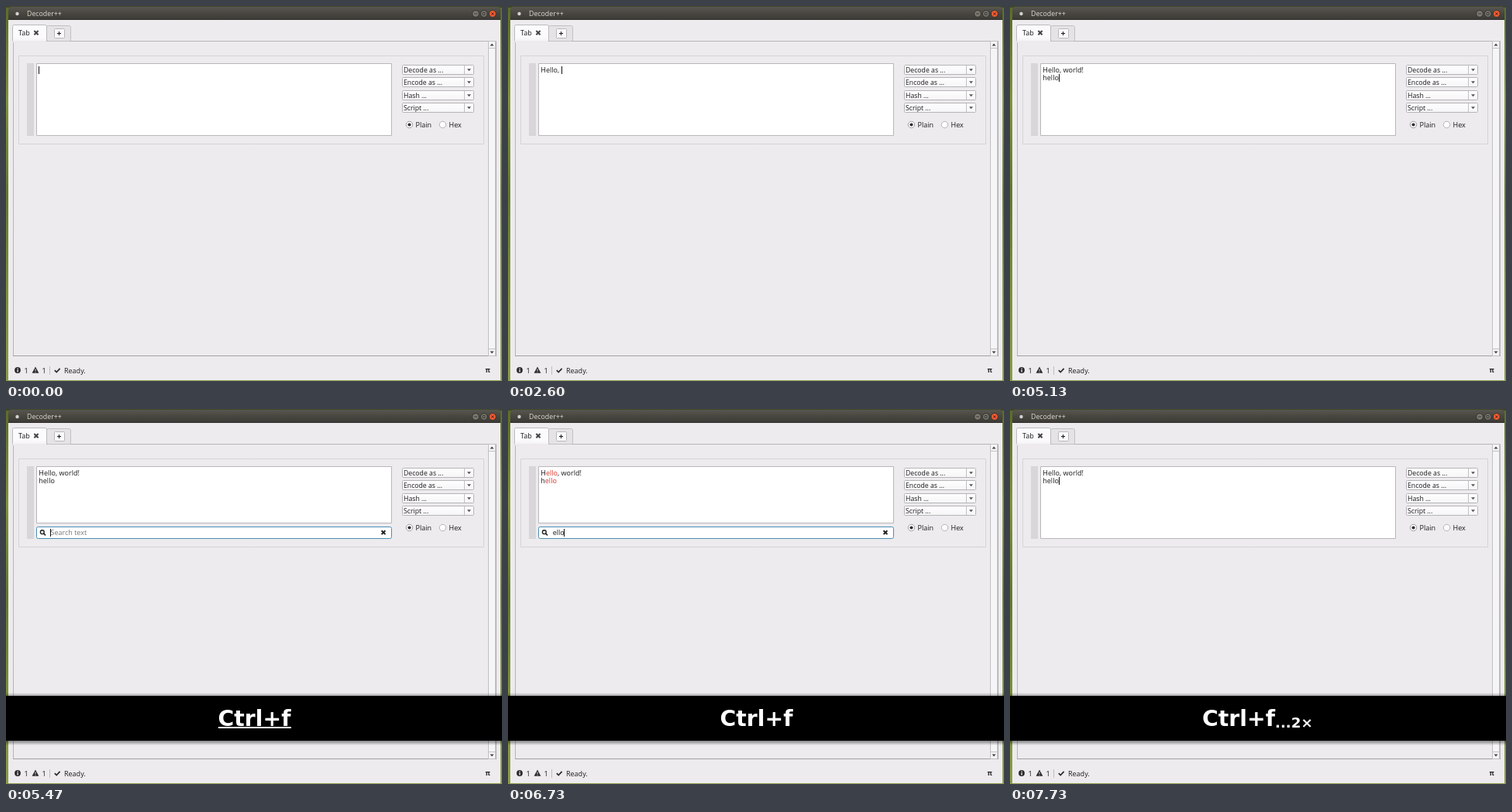
These frames come from a looping animation (640x485 px, 8000 ms). An HTML page with a canvas:

```html
<!DOCTYPE html>
<html lang="en">
<head>
<meta charset="utf-8">
<title>Decoder++</title>
<style>
  html, body { margin: 0; width: 100%; height: 100%; overflow: hidden; }
  canvas { display: block; width: 640px; height: 485px; }
</style>
</head>
<body>
<canvas id="stage" width="640" height="485"></canvas>
<script>
const ctx = document.getElementById('stage').getContext('2d');
const LOOP = 8000;
const UI = '"Open Sans", "Noto Sans", sans-serif';
const KEYS = '"DejaVu Sans", sans-serif';
const INK = '#1b1a1b', RED = '#d9352a', PANEL = '#edebee';

// Time at which each character of a string is typed.
const EDITOR = {
  text: 'Hello, world!\nhello',
  times: [1470, 1670, 1870, 2000, 2200, 2470, 2600, 2730, 2870, 3000, 3130, 3270, 3530, 4130,
    4270, 4600, 4730, 4930, 5070]
};
const QUERY = { text: 'ello', times: [6130, 6270, 6470, 6670] };
const CARET_HIDDEN = [[670, 1330], [3730, 4130]];
const SEARCH_OPEN = 5470, SEARCH_CLOSE = 7330, KEY_HELD = 200;

const within = (t, from, to) => t >= from && t < to;
const typed = ({ text, times }, t) => text.slice(0, times.filter(x => x <= t).length);

function rect(x, y, w, h, color) {
  ctx.fillStyle = color;
  ctx.fillRect(x, y, w, h);
}

function box(x, y, w, h, fill, stroke, radius = 0) {
  ctx.beginPath();
  ctx.roundRect(x + 0.5, y + 0.5, w - 1, h - 1, radius);
  if (fill) { ctx.fillStyle = fill; ctx.fill(); }
  if (stroke) { ctx.strokeStyle = stroke; ctx.lineWidth = 1; ctx.stroke(); }
}

function disc(x, y, r, fill, stroke) {
  ctx.beginPath();
  ctx.arc(x, y, r, 0, Math.PI * 2);
  ctx.fillStyle = fill;
  ctx.fill();
  if (stroke) { ctx.strokeStyle = stroke; ctx.lineWidth = 1; ctx.stroke(); }
}

function polygon(points, color) {
  ctx.beginPath();
  points.forEach(([x, y]) => ctx.lineTo(x, y));
  ctx.fillStyle = color;
  ctx.fill();
}

function stroke(points, color, width) {
  ctx.beginPath();
  points.forEach(([x, y]) => ctx.lineTo(x, y));
  ctx.strokeStyle = color;
  ctx.lineWidth = width;
  ctx.stroke();
}

function cross(x, y, r, color, width) {
  stroke([[x - r, y - r], [x + r, y + r]], color, width);
  stroke([[x - r, y + r], [x + r, y - r]], color, width);
}

function label(text, x, y, color = INK, size = 9, family = UI, weight = 400) {
  ctx.font = `${weight} ${size}px ${family}`;
  ctx.fillStyle = color;
  ctx.fillText(text, x, y);
  return ctx.measureText(text).width;
}

function gradient(y0, y1, ...colors) {
  const g = ctx.createLinearGradient(0, y0, 0, y1);
  colors.forEach((c, i) => g.addColorStop(i / (colors.length - 1), c));
  return g;
}

function caret(x, y) {
  rect(Math.round(x), y, 1, 10, '#111');
}

function drawWindow() {
  rect(0, 0, 640, 485, gradient(0, 485, '#5b6d27', '#80953a', '#63792c', '#7b9138', '#8c9c48'));
  rect(0, 0, 640, 2, '#3f4529');
  rect(3, 14, 635, 470, PANEL);
  ctx.beginPath();
  ctx.roundRect(3, 1, 635, 17, [4, 4, 0, 0]);
  ctx.fillStyle = gradient(1, 18, '#58564f', '#484640', '#3b3a36');
  ctx.fill();
  rect(3, 17, 635, 1, '#2f2e2b');
  disc(14.5, 10, 2.2, '#d5d3d0');
  label('Decoder++', 27, 13, '#dfdbd2', 8.8);

  disc(606, 10, 4.3, '#7b7870', '#34332f');
  disc(616.7, 10, 4.3, '#7b7870', '#34332f');
  disc(627.8, 10, 4.5, '#ec5c33', '#34332f');
  rect(604, 9.5, 4, 1, '#3a3935');
  box(614.5, 8, 4, 4, null, '#3a3935');
  cross(627.8, 10, 1.6, '#4a2519', 1);
}

function drawTabs() {
  box(9, 45, 624, 408, PANEL, '#b7b5b8');
  rect(9, 452, 624, 1, '#a19fa2');
  box(52, 25, 32, 21, '#e5e3e6', '#c3c1c4', 2);
  box(8, 24, 45, 23, '#fbfafc', '#bcbabd', 2);
  rect(9, 44, 43, 3, PANEL);
  rect(9, 40, 43, 5, gradient(40, 45, '#fbfafc', '#f5f3f6'));
  label('Tab', 16, 38);
  cross(39, 34.6, 2.6, '#454346', 2);
  box(62, 29, 14, 13, '#faf9fb', '#bab8bb', 1);
  rect(66, 35, 5, 1, INK);
  rect(68, 33, 1, 5, INK);
}

function drawScrollbar() {
  box(622, 45, 10, 408, '#f5f4f6', '#c1bfc2');
  rect(623, 54, 8, 1, '#c1bfc2');
  rect(623, 443, 8, 1, '#c1bfc2');
  polygon([[624.5, 51.5], [629.5, 51.5], [627, 48.5]], '#444');
  polygon([[624.5, 446.5], [629.5, 446.5], [627, 449.5]], '#444');
}

function drawControls() {
  box(16, 64, 601, 115, null, '#d5d3d6');
  rect(27, 74, 9, 94, '#d8d6d9');
  ['Decode as ...', 'Encode as ...', 'Hash ...', 'Script ...'].forEach((name, i) => {
    const y = Math.round(76 + i * 16.3);
    box(511, y, 93, 13, gradient(y, y + 13, '#ffffff', '#f5f4f6'), '#b6b4b7', 1);
    rect(591, y + 1, 1, 11, '#c2c0c3');
    polygon([[595, y + 5.3], [600, y + 5.3], [597.5, y + 8.3]], '#555');
    label(name, 513, y + 10, INK, 8.7);
  });
  disc(520.5, 153.5, 4.2, '#fdfdfd', '#9f9da0');
  disc(520.5, 153.5, 2.1, '#303030');
  disc(563.5, 153.5, 4.2, '#fdfdfd', '#b5b3b6');
  label('Plain', 528.5, 157);
  label('Hex', 571.5, 157);
}

function drawStatus() {
  disc(15, 471, 3.9, '#2b2a2b');
  rect(14.4, 468.3, 1.4, 1.2, PANEL);
  rect(14.4, 470.3, 1.4, 3.2, PANEL);
  label('1', 23.5, 474.5);
  polygon([[38, 466.6], [42.4, 474.7], [33.6, 474.7]], '#2b2a2b');
  rect(37.5, 469.5, 1, 2.4, PANEL);
  rect(37.5, 472.7, 1, 1, PANEL);
  label('1', 46.5, 474.5);
  rect(56, 466, 1, 11, '#bfbdc0');
  stroke([[62.8, 471.2], [65.2, 473.5], [69.6, 468.8]], '#2b2a2b', 1.7);
  label('Ready.', 75, 474.5);
  label('π', 618.5, 473.5, INK, 8.5, UI, 700);
}

function drawLine(text, x, y, query) {
  const at = query ? text.indexOf(query) : -1;
  if (at < 0) return label(text, x, y);
  const end = at + query.length;
  let width = label(text.slice(0, at), x, y);
  width += label(text.slice(at, end), x + width, y, RED);
  return width + label(text.slice(end), x + width, y);
}

function drawEditor(t, searching, query) {
  box(39, 74, 459, searching ? 74 : 94, '#ffffff', '#b9b7ba');
  const lines = typed(EDITOR, t).split('\n');
  let width = 0;
  lines.forEach((line, i) => { width = drawLine(line, 42.3, 86 + i * 10.4, query); });
  const hidden = CARET_HIDDEN.some(([from, to]) => within(t, from, to));
  if (!searching && !hidden) caret(42.3 + width, 78 + (lines.length - 1) * 10);
}

function drawSearch(query) {
  box(39, 152, 459, 16, '#ffffff', '#4b8fb5', 2);
  ctx.beginPath();
  ctx.arc(46.8, 159.2, 2.4, 0, Math.PI * 2);
  ctx.strokeStyle = '#222';
  ctx.lineWidth = 1.4;
  ctx.stroke();
  stroke([[48.6, 161], [51, 163.4]], '#222', 1.7);
  cross(487, 159.7, 2.4, '#222', 2);
  const width = query ? label(query, 57.7, 163) : 0;
  if (!query) label('Search text', 57.5, 163, '#7b797c');
  caret(57.3 + width, 155);
}

function drawKeys(t) {
  const repeated = t >= SEARCH_CLOSE;
  const held = t - (repeated ? SEARCH_CLOSE : SEARCH_OPEN) < KEY_HELD;
  rect(0, 367, 640, 4, gradient(367, 371, 'rgba(0,0,0,0)', 'rgba(0,0,0,.3)'));
  rect(0, 429, 640, 6, gradient(429, 435, 'rgba(0,0,0,.45)', 'rgba(0,0,0,0)'));
  rect(0, 371, 640, 58, '#000');
  const left = repeated ? 248 : 273.5;
  const width = label('Ctrl+f', left, 409.5, '#fff', 28.3, KEYS, 700);
  if (repeated) label('...2×', left + width, 412, '#fff', 18.3, KEYS, 700);
  if (held) rect(left + 0.5, 411, width, 2, '#fff');
}

function draw(t) {
  const searching = within(t, SEARCH_OPEN, SEARCH_CLOSE);
  const query = searching ? typed(QUERY, t) : '';
  drawWindow();
  drawTabs();
  drawScrollbar();
  drawControls();
  drawStatus();
  drawEditor(t, searching, query);
  if (searching) drawSearch(query);
  if (t >= SEARCH_OPEN) drawKeys(t);
}

const start = performance.now();
function tick() {
  draw((performance.now() - start) % LOOP);
  requestAnimationFrame(tick);
}
tick();
</script>
</body>
</html>
```
